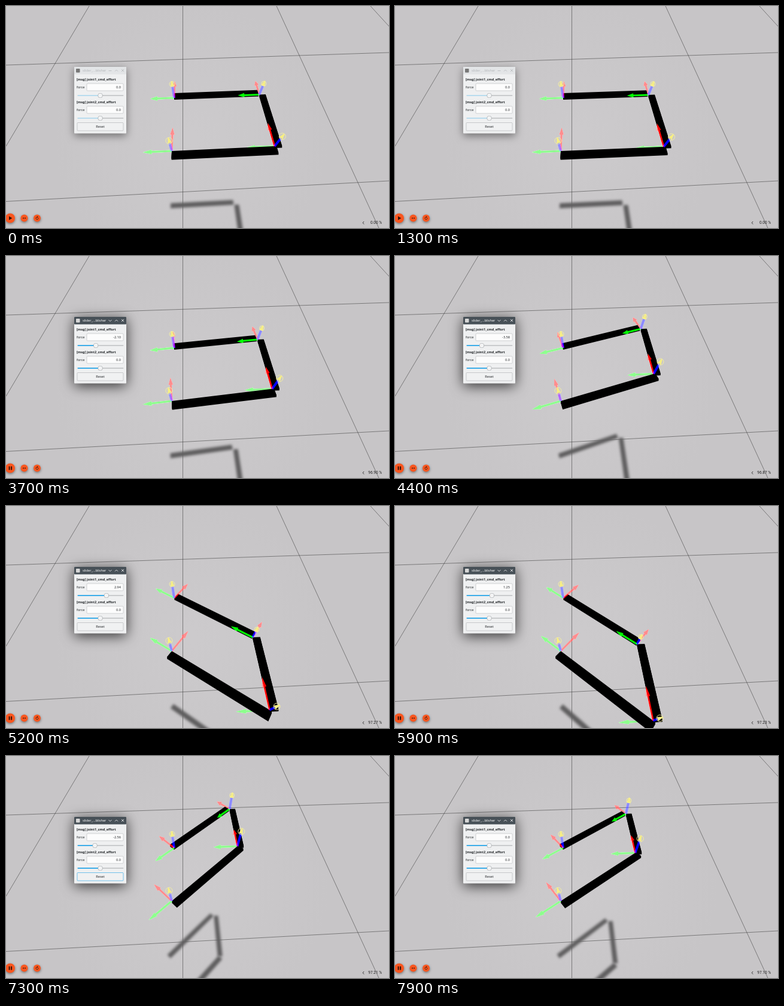
These frames come from a looping animation (640x372 px, 8 s). An HTML page with a canvas:

```html
<!DOCTYPE html>
<html lang="en">
<head>
<meta charset="utf-8">
<style>
html, body { margin: 0; width: 100%; height: 100%; overflow: hidden; background: #c8c6c8; }
canvas { display: block; }
</style>
</head>
<body>
<canvas id="stage" width="640" height="372"></canvas>
<script>
const ctx = document.getElementById('stage').getContext('2d');
const LOOP = 8000, STEP = 100;

// Keys are [ms, value]
const swing = [[0, 0], [3200, 0], [3600, -.06], [4000, -.17], [4400, -.275], [4600, -.25], [5200, .625],
  [5600, .85], [6000, .65], [6500, .167], [7000, -.53], [7300, -.745], [7450, -.768], [7900, -.609]];
const effort = [[0, 0], [3100, 0], [3700, -2.1], [4400, -3.58], [4700, -2.8], [5200, 2.94], [5600, 3.2],
  [6000, .6], [6500, -1.66], [6900, -2.56], [7500, -2.56], [7501, 0], [7900, 0]];
const speed = [[0, 0], [1899, 0], [1900, 96.8], [2600, 96.94], [4400, 96.87], [5200, 97.27],
  [6500, 97.19], [7300, 97.21], [7900, 97.1]];

function sample(keys, t, smooth) {
  let i = keys.findIndex(k => k[0] > t);
  if (i < 0) return keys[keys.length - 1][1];
  const [t0, a] = keys[i - 1], [t1, b] = keys[i];
  const u = (t - t0) / (t1 - t0);
  if (!smooth) return a + (b - a) * u;
  const slope = j => {
    const p = keys[Math.max(0, j - 1)], n = keys[Math.min(keys.length - 1, j + 1)];
    return (n[1] - p[1]) / (n[0] - p[0]) * (t1 - t0);
  };
  const u2 = u * u, u3 = u2 * u;
  return a * (2 * u3 - 3 * u2 + 1) + slope(i - 1) * (u3 - 2 * u2 + u)
    + b * (3 * u2 - 2 * u3) + slope(i) * (u3 - u2);
}

// Perspective of the mechanism plane, or of its shadow on the floor
function project([x, v], onFloor) {
  const s = onFloor ? .53 : 1;
  const px = s * x - .033;
  const w = (onFloor ? .001568 : .0022055) - .00163 * s * v + 8.6e-5 * px;
  return [296 + px / w, 1 / w - 300];
}
const along = (p, d, n) => [p[0] + d[0] * n, p[1] + d[1] * n];

function path(points, close = true) {
  ctx.beginPath();
  points.forEach(p => ctx.lineTo(...p));
  if (close) ctx.closePath();
}
function line(color, width, ...points) {
  path(points, false);
  ctx.strokeStyle = color;
  ctx.lineWidth = width;
  ctx.stroke();
}
function disc(x, y, r, color) {
  ctx.beginPath();
  ctx.arc(x, y, r, 0, 7);
  ctx.fillStyle = color;
  ctx.fill();
}
function rect(x, y, w, h, color, border, r = 1) {
  ctx.beginPath();
  ctx.roundRect(x, y, w, h, r);
  ctx.fillStyle = color;
  ctx.fill();
  if (border) {
    ctx.strokeStyle = border;
    ctx.lineWidth = .7;
    ctx.stroke();
  }
}
function text(str, x, y, color = '#232629', align = 'left', font = '5.6px "Noto Sans", sans-serif') {
  ctx.font = font;
  ctx.fillStyle = color;
  ctx.textAlign = align;
  ctx.textBaseline = 'middle';
  ctx.fillText(str, x, y);
}

// Darkens what lies behind, then adds its own light
function glow(points, color) {
  path(points);
  ctx.fillStyle = 'rgba(0,0,0,.3)';
  ctx.fill();
  ctx.globalCompositeOperation = 'lighter';
  ctx.fillStyle = color;
  ctx.fill();
  ctx.globalCompositeOperation = 'source-over';
}
function arrow([x0, y0], [x1, y1], color) {
  const len = Math.hypot(x1 - x0, y1 - y0), ux = (x1 - x0) / len, uy = (y1 - y0) / len;
  const at = (a, s) => [x0 + ux * a - uy * s, y0 + uy * a + ux * s];
  const neck = len * .7;
  glow([at(0, -1.5), at(neck, -1.5), at(neck, -3.6), at(len, 0), at(neck, 3.6), at(neck, 1.5), at(0, 1.5)], color);
}
function axis(p, dir, length, color) {
  arrow(project(p), project(along(p, dir, length)), color);
}

function upright(p, lift, r) {
  const [x, y] = project(p);
  const dx = (x - 318) * lift, dy = (y - 400) * lift, len = Math.hypot(dx, dy);
  const ux = dx / len, uy = dy / len;
  const at = (a, s) => [x + ux * a - uy * s, y + uy * a + ux * s];
  glow([at(0, -2), at(len, -2), at(len, 2), at(0, 2)], '#00f');
  path([at(len - 4, -3.4), at(len + 5, -1), at(len + 5, 1), at(len - 4, 3.4)]);
  ctx.fillStyle = '#f6ee84';
  ctx.fill();
  ctx.beginPath();
  ctx.arc(...at(len, 0), r, 0, 7);
  ctx.strokeStyle = '#f5efa0';
  ctx.lineWidth = 1;
  ctx.stroke();
}

function bar(p, dir, length, side, onFloor) {
  const q = along(p, dir, length);
  const corners = [p, q, along(q, side, .024), along(p, side, .024)].map(c => project(c, onFloor));
  for (let drop = 0; drop <= (onFloor ? 0 : 3); drop++) {
    path(corners.map(([x, y]) => [x, y + drop]));
    ctx.fill();
  }
}

function mechanism(angle) {
  const dir = [Math.cos(angle), Math.sin(angle)], back = [-dir[0], -dir[1]];
  const up = [dir[1], -dir[0]], down = [-dir[1], dir[0]];
  const a = [0, 0], b = [-.002, .2214];
  const c = along(a, dir, .3165), d = along(b, dir, .3205);
  const bars = onFloor => {
    bar(a, dir, .314, up, onFloor);
    bar(b, dir, .327, down, onFloor);
    bar(c, [d[0] - c[0], d[1] - c[1]], 1, [1, 0], onFloor);
  };

  ctx.save();
  ctx.filter = 'blur(2px)';
  ctx.fillStyle = ctx.strokeStyle = '#5e5d5e';
  bars(true);
  ctx.restore();

  axis(d, [-1, 0], .088, '#0f0');
  axis(c, up, .073, '#f00');
  ctx.fillStyle = '#000';
  bars(false);

  for (const p of [a, b]) {
    axis(p, up, .088, '#f00');
    axis(p, back, .088, '#0f0');
  }
  axis(c, back, .08, '#0f0');
  axis(d, [0, -1], .09, '#f00');
  upright(a, .094, 4.5);
  upright(b, .11, 5.5);
  upright(c, .073, 4);
  upright(d, .1, 5.5);
}

function floor() {
  const light = ctx.createRadialGradient(310, 220, 10, 310, 220, 230);
  light.addColorStop(0, '#cccacc');
  light.addColorStop(1, '#c7c5c7');
  ctx.fillStyle = light;
  ctx.fillRect(0, 0, 640, 372);
  const grid = (...points) => line('rgba(50,50,50,.65)', .8, ...points);
  grid([139, 0], [0, 235]);
  grid([295.5, 0], [295.5, 372]);
  grid([452, 0], [623, 372]);
  grid([609, 0], [640, 34]);
  grid([0, 99], [640, 78]);
  grid([0, 327.5], [640, 293]);
}

function control(name, y, value, label, active) {
  text(`[msg] ${name}_cmd_effort`, 118, y, '#232629', 'left', 'bold 5.6px "Noto Sans", sans-serif');
  text('force', 118, y + 13);
  rect(135, y + 7, 61, 12, '#fcfcfc', '#bfc1c3');
  text(label, 192, y + 13, '#232629', 'right');
  const knob = 157.5 + value * 3.5;
  rect(119.5, y + 26, 77, 2, '#c9cbcd');
  rect(119.5, y + 26, knob - 119.5, 2, active ? '#3daee9' : '#b9dcee');
  disc(knob, y + 27, 4, '#a3a6a8');
  disc(knob, y + 27, 3.4, '#f3f4f5');
}

function panel(t, force) {
  const active = t >= 3000;
  ctx.save();
  ctx.shadowColor = active ? 'rgba(0,0,0,.75)' : 'rgba(0,0,0,.45)';
  ctx.shadowBlur = active ? 22 : 14;
  ctx.shadowOffsetY = 4;
  rect(114, 102, 87, 111.5, '#eff0f1');
  ctx.restore();
  rect(114, 102, 87, 12.5, active ? '#475057' : '#e3e5e7');
  rect(117, 105, 6.5, 6.5, active ? '#d8d8d8' : '#777');
  const ink = active ? '#fcfcfc' : '#b5b8bb';
  text('slider_...blisher', 128, 108, ink);
  if (active) line(ink, .8, [171.5, 107], [174, 109.5], [176.5, 107]);
  else line(ink, .8, [171.5, 108.5], [176.5, 108.5]);
  line(ink, .8, [182, 109.5], [184.5, 107], [187, 109.5]);
  line(ink, .8, [193, 106], [197, 110]);
  line(ink, .8, [197, 106], [193, 110]);

  control('joint1', 123, force, force ? force.toFixed(2) : '0.0', active);
  control('joint2', 161, 0, '0.0', active);
  const hover = t >= 7200 && t < 7700;
  rect(119, 195.5, 77, 13.5, '#f0f1f2', hover ? '#3daee9' : '#b6b8ba');
  text('Reset', 157.5, 202.3, '#232629', 'center');
}

function toolbar(t) {
  const orange = '#f9561f', dark = '#30140a';
  for (const [x, r] of [[7, 8], [30.5, 6], [52, 6]]) {
    ctx.save();
    ctx.shadowColor = 'rgba(0,0,0,.45)';
    ctx.shadowBlur = 4;
    ctx.shadowOffsetY = 1.5;
    disc(x, 355.5, r, orange);
    ctx.restore();
  }
  ctx.fillStyle = dark;
  if (t < 1600) {
    path([[5, 352.2], [10.3, 355.5], [5, 358.8]]);
    ctx.fill();
  } else {
    ctx.fillRect(4.6, 352.5, 2, 6);
    ctx.fillRect(8.1, 352.5, 2, 6);
  }
  disc(29, 355.5, .9, dark);
  disc(32, 355.5, .9, dark);
  ctx.beginPath();
  ctx.arc(52, 355.7, 2, -.3, 4.6);
  ctx.strokeStyle = dark;
  ctx.lineWidth = .8;
  ctx.stroke();
  path([[51.8, 352.2], [54, 353.6], [51.8, 355]]);
  ctx.fillStyle = dark;
  ctx.fill();

  line('#222', .9, [598.2, 361], [596.2, 363.3], [598.2, 365.6]);
  text(sample(speed, t).toFixed(2) + ' %', 628, 363.5, '#222', 'right', '6.5px Roboto, sans-serif');
}

function draw() {
  const t = Math.floor(performance.now() % LOOP / STEP) * STEP;
  floor();
  mechanism(sample(swing, t, true));
  panel(t, sample(effort, t));
  toolbar(t);
  requestAnimationFrame(draw);
}
draw();
</script>
</body>
</html>
```
